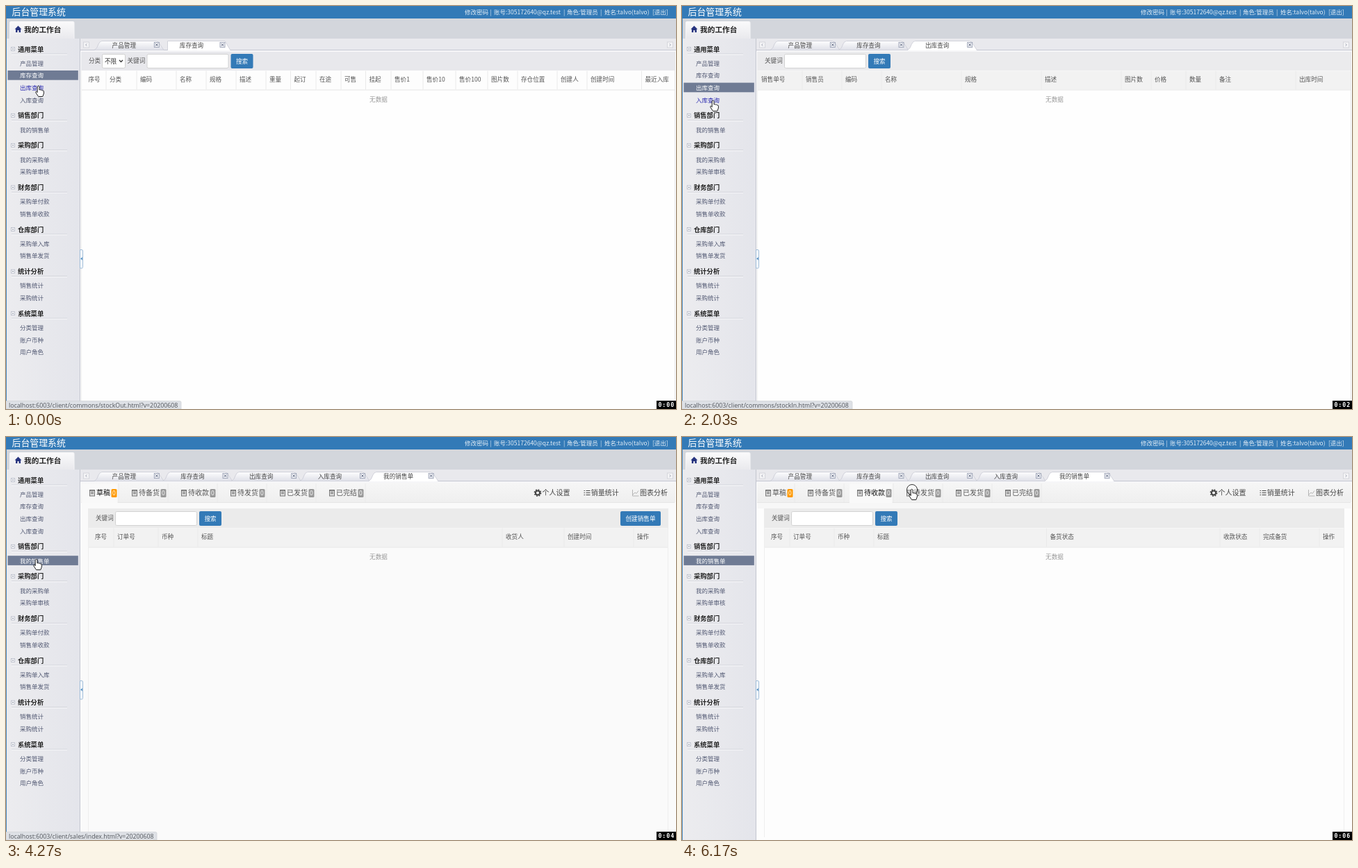
Recreate the animation shown at these times as an HTML page. Size 964 px wide and 581 px high, loop 6.27 s.

```html
<!DOCTYPE html>
<html lang="zh-CN">
<head>
<meta charset="utf-8">
<title>后台管理系统</title>
<style>
  html, body { margin: 0; width: 100%; height: 100%; overflow: hidden; background: #fff; }
  svg { position: absolute; left: 0; top: 0; width: 964px; height: 581px; }
  text { font-family: "Noto Sans CJK SC", "Noto Sans CJK", "Noto Sans", sans-serif; white-space: pre; }
  .url { font-family: "Open Sans", sans-serif; }
  .clock { font-family: "DejaVu Sans Mono", monospace; letter-spacing: 1px; }
</style>
</head>
<body>
<svg viewBox="0 0 964 581">
  <defs>
    <linearGradient id="side"><stop stop-color="#ececef"/><stop offset="1" stop-color="#e4e5eb"/></linearGradient>
    <linearGradient id="tab" x2="0" y2="1"><stop stop-color="#fdfdfe"/><stop offset="1" stop-color="#dfe0e8"/></linearGradient>
    <linearGradient id="desk" x2="0" y2="1"><stop stop-color="#fafafb"/><stop offset="1" stop-color="#e9e9ed"/></linearGradient>
    <linearGradient id="strip" x2="0" y2="1"><stop stop-color="#f6f6f6"/><stop offset="1" stop-color="#efefef"/></linearGradient>
  </defs>
  <g id="frame"></g>
  <g id="live"></g>
</svg>
<script>
const LOOP = 6270;
const BLUE = '#337ab7';

const MENU = [
  ['通用菜单', '产品管理', '库存查询', '出库查询', '入库查询'],
  ['销售部门', '我的销售单'],
  ['采购部门', '我的采购单', '采购单审核'],
  ['财务部门', '采购单付款', '销售单收款'],
  ['仓库部门', '采购单入库', '销售单发货'],
  ['统计分析', '销售统计', '采购统计'],
  ['系统菜单', '分类管理', '账户币种', '用户角色']
];
const TABS = ['产品管理', '库存查询', '出库查询', '入库查询', '我的销售单'];
const STAGES = ['草稿', '待备货', '待收款', '待发货', '已发货', '已完结'];

// Column label and its left edge
const COLS = {
  stock: '序号 118.5,分类 149,编码 193,名称 250,规格 293,描述 336,重量 379,起订 414.5,在途 451,可售 487,挂起 522.5,售价1 559,售价10 605,售价100 652,图片数 698,存仓位置 741,创建人 798,创建时间 841,最近入库 919.5',
  out: '销售单号 114,销售员 178,编码 235,名称 292,规格 407,描述 522,图片数 637,价格 680,数量 730,备注 773,出库时间 888',
  in: '采购单号 114,采购员 178,编码 235,名称 292,规格 384,描述 475.5,图片数 567,价格 610,数量 660,采购备注 703,入库备注 795,入库时间 887',
  draft: '序号 128,订单号 160,币种 224,标题 281,收货人 719,创建时间 808,操作 908',
  ready: '序号 128,订单号 160,币种 224,标题 281,备货状态 529.5,收款状态 779,完成备货 836,操作 922'
};

// Each step changes only what it lists
const STEPS = [
  [0, { x: 47, y: 115, ring: 0, sel: '库存查询', hover: '出库查询', tabs: 2, on: 1,
        view: 'stock', head: 1, rows: 1, stage: 0, url: 'commons/stockOut', fade: 0 }],
  [210, { x: 46, y: 117, ring: 1 }],
  [430, { ring: 0, sel: '出库查询', hover: '', on: -1, view: '', head: 0, rows: 0 }],
  [640, { view: 'out' }],
  [850, { tabs: 3, on: 2, head: 1 }],
  [1070, { rows: 1 }],
  [1510, { y: 121 }],
  [1720, { y: 129, hover: '入库查询', url: 'commons/stockIn' }],
  [1820, { x: 45, y: 134 }],
  [2030, { y: 136 }],
  [2240, { ring: 1 }],
  [2460, { ring: 0, sel: '入库查询', hover: '', on: -1, view: 'in', head: 0, rows: 0 }],
  [2670, { tabs: 4, on: 3, head: 1 }],
  [2880, { rows: 1 }],
  [2980, {}],
  [3420, { y: 146 }],
  [3630, { x: 44, y: 168, hover: '我的销售单', url: 'sales/index' }],
  [3840, { y: 176, hover: '', ring: 1 }],
  [4060, { ring: 0, sel: '我的销售单', on: -1, view: '', head: 0, rows: 0 }],
  [4270, { tabs: 5, on: 4, view: 'draft', head: 1, rows: 1 }],
  [4490, { x: 60, y: 165 }],
  [4590, { x: 98, y: 135 }],
  [4800, { x: 165, y: 94 }],
  [5010, { x: 192, y: 82, fade: 1 }],
  [5230, { ring: 1, url: '' }],
  [5440, { x: 210, ring: 0, stage: 1, view: 'ready', head: 0, rows: 0 }],
  [5650, { x: 268, y: 81 }],
  [5860, { ring: 1 }],
  [6070, { x: 295, y: 79, ring: 0, stage: 2 }],
  [6170, { x: 331, y: 75, ring: 1, head: 1, rows: 1 }]
];

const box = (x, y, w, h, fill, more = '') =>
  `<rect x="${x}" y="${y}" width="${w}" height="${h}" fill="${fill}" ${more}/>`;
const path = (d, stroke, fill = 'none', more = '') =>
  `<path d="${d}" stroke="${stroke}" fill="${fill}" ${more}/>`;
const text = (s, x, y, size = 8.6, fill = '#555', more = '') =>
  `<text x="${x}" y="${y + size * .38}" font-size="${size}" fill="${fill}" ${more}>${s}</text>`;
const MID = 'text-anchor="middle"';
const BOLD = 'font-weight="700"';
const hline = (x1, x2, y, c) => path(`M${x1} ${y}H${x2}`, c);
const vline = (x, y1, y2, c) => path(`M${x} ${y1}V${y2}`, c);

function button(s, x, y, w) {
  return box(x, y, w, 21, BLUE, 'rx="2"') + text(s, x + w / 2, y + 10.5, 8.6, '#fff', MID + ' font-weight="500"');
}

function search(x, y, focus) {
  return text('关键词', x, y + 9.5) +
    box(x + 28.5, y + .5, 117, 20, '#fff', `rx="2" stroke="${focus ? '#888' : '#d2d2d2'}"`) +
    button('搜索', x + 149, y, 32);
}

// Visits every menu line with its vertical centre
function eachLine(fn) {
  let y = 62;
  for (const [group, ...items] of MENU) {
    fn(group, y, true);
    items.forEach((s, i) => fn(s, y += i ? 17.6 : 20.5, false));
    y += 22.5;
  }
}

function frame() {
  let s = box(0, 0, 964, 581, '#fefefe') + box(0, 18, 964, 29, '#d3d6dc') +
    box(0, 0, 964, 18, BLUE) + text('后台管理系统', 8.5, 8, 12.9, '#fff');
  [['修改密码', 660], ['|', 696.5], ['账号:305172640@qz.test', 702], ['|', 802], ['角色:管理员', 807],
   ['|', 855], ['姓名:talvo(talvo)', 861], ['[退出]', 930]]
    .forEach(([t, x]) => s += text(t, x, 8.3, 8.5, '#e3edf6'));
  s += box(0, 47, 106, 534, 'url(#side)') + box(106, 47, 858, 17, '#e9e9ed');
  s += path('M5.5 47V24Q5.5 22.5 7 22.5H96.5Q98 22.5 98 24V47', '#f5f5f7', 'url(#desk)');
  s += path('M12.5 33.5L17.5 28.5L22.5 33.5H21V38H18.6V35H16.4V38H14V33.5Z', 'none', '#27347f');
  s += text('我的工作台', 26, 33.7, 10.7, '#222', BOLD);
  s += vline(.5, 18, 581, '#4b8ac0') + vline(106.5, 47, 581, '#c3c6cf');
  s += hline(107, 964, 63.5, '#c5c7d2') + box(107, 64, 857, 2, '#f6f6f8');
  for (const [x, d] of [[115.5, 1], [955.5, -1]])
    s += box(x - 4, 52, 8, 8, '#f4f4f6', 'stroke="#d5d6dc"') +
      path(`M${x + d} 54.5l${-2 * d} 1.5l${2 * d} 1.5`, '#aaaebb');
  eachLine((t, y, group) => {
    if (!group) return;
    s += box(7.5, y - 2.5, 5, 5, '#f7f7f9', 'stroke="#b4b8c5" stroke-width=".8"') + hline(9, 11, y, '#7f8798');
    s += text(t, 17, y, 9.3, '#222', BOLD) + hline(8, 88, y + 7, '#cfd1d8') + hline(8, 88, y + 8, '#f9f9fb');
  });
  return s;
}

function menu(st) {
  let s = '';
  eachLine((t, y, group) => {
    if (group) return;
    const sel = t === st.sel;
    if (sel) s += box(2.5, y - 7.1, 101.3, 13.7, '#6f7b94');
    s += text(t, 20, y, 8.5, sel ? '#fff' : t === st.hover ? '#2b2bb0' : '#515872');
  });
  return s;
}

function tabs(st) {
  let s = '';
  TABS.slice(0, st.tabs).forEach((t, i) => {
    const x = 127 + i * 98.7, on = i === st.on;
    const early = on && i === 1;
    const d = early ? `M232.5 64V50.5H315L323 64`
      : `M${x} 63.5Q${x + 4} 62 ${x + 6} 55Q${x + 8} 50.5 ${x + 11} 50.5H${x + 89}Q${x + 92} 50.5 ${x + 95} 56L${x + 100} 63.5`;
    s += path(d, '#c9cbd5', on ? '#fff' : 'url(#tab)', 'stroke-width=".8"');
    if (on) s += hline(early ? 233 : x + 1, early ? 322 : x + 99, 63.5, '#fff');
    const cx = 216.8 + i * 98.7 - (early ? 4 : 0);
    s += text(t, 169.8 + i * 98.7 - (early ? 1.5 : 0), 57, 8.6, '#444', MID);
    s += box(cx - 3.5, 52.5, 7, 7, '#f3f4f8', 'stroke="#8e96ab" stroke-width=".8"') +
      path(`M${cx - 1.8} 54.2l3.6 3.6m0-3.6l-3.6 3.6`, '#5c667f');
  });
  return s;
}

function table(st, x1, x2, y, bg) {
  let s = '';
  if (st.head) {
    s += box(x1, y, x2 - x1, 27, bg) + hline(x1, x2, y + 27.5, '#e6e6e6');
    COLS[st.view].split(',').forEach((col, i) => {
      const [t, x] = col.split(' ');
      if (i) s += vline(x - 5, y, y + 27, '#eaeaea');
      s += text(t, +x, y + 12.5);
    });
  }
  if (st.rows) s += text('无数据', 536, y + 41.5, 8.6, '#999', MID);
  return s;
}

function list(st) {
  const stock = st.view === 'stock';
  let s = box(108, 66, 855, 27, stock ? '#e8e8ec' : '#ebebed');
  if (stock) {
    s += text('分类', 119, 79) + box(138.5, 69.5, 33, 20, '#fff', 'rx="2" stroke="#cfcfcf"') +
      text('不限', 142, 79.5, 8.6, '#333') + path('M163 78l2.5 2.5l2.5-2.5', '#333', 'none', 'stroke-width="1.3"') +
      search(174.5, 69, false);
  } else s += search(119, 69, !st.head);
  s += table(st, 109, 962, 93.5, stock ? '#fdfdfd' : '#f2f2f2');
  return s + vline(108.5, 93, 569, '#eee') + vline(962.5, 66, 569, '#e6e6e8');
}

function note(x) {
  return box(x, 76.5, 7, 8.5, '#dcdcdc', 'stroke="#777"') + hline(x, x + 7, 77, '#555') +
    path(`M${x + 1.5} 79.5h4m-4 2h4`, '#666', 'none', 'stroke-width=".9"');
}

function sales(st) {
  const draft = st.view === 'draft';
  let s = box(108, 66, 855, 515, draft ? '#fafafa' : '#fdfdfd') + box(108, 66, 855, 28, 'url(#strip)') +
    hline(108, 962, 94.5, '#e6e6e6');
  if (!draft) s += box(108, 95, 855, 8, '#f7f7f7');
  STAGES.forEach((t, i) => {
    const x = i ? 181 + (i - 1) * 71 : 120, on = i === st.stage;
    const end = x + 10 + t.length * 10 + 1.5;
    if (on) s += box(x - 11, 67, end - x + 20, 28, st.stage === 1 ? '#fff' : '#f9f9f9');
    s += vline(end + 10.5, 67, 94, '#eaeaea') + note(x + .5) +
      text(t, x + 10, 80.3, 10, on ? '#111' : '#555', on ? 'font-weight="500"' : '') +
      box(end, 75, 8, 12, i ? '#999' : '#f90', 'rx="1.5"') + text('0', end + 4, 81, 8.6, '#fff', MID);
  });
  s += '<circle cx="765" cy="80.5" r="3.1" fill="none" stroke="#444" stroke-width="2"/>' +
    '<circle cx="765" cy="80.5" r="4.6" fill="none" stroke="#444" stroke-width="1.6" stroke-dasharray="1.8 1.81"/>' +
    text('个人设置', 771.5, 80.3, 10, '#444');
  s += path('M831.5 77.5h1.5m1.5 0h6m-9 3h1.5m1.5 0h6m-9 3h1.5m1.5 0h6', '#444') + text('销量统计', 841.8, 80.3, 10, '#444');
  s += path('M901.5 76V85H910.5M902 83l3-3l2 1.5l3-4', '#b5b5b5') + text('图表分析', 912, 80.3, 10, '#444');
  if (!st.head) return s + box(118, 103, 835, 472, '#fff');
  s += box(118, 103, 835, 28, '#ebebeb') + search(129, 107, false);
  if (draft) s += button('创建销售单', 884, 107, 58);
  return s + table(st, 118, 953, 131.5, '#f2f2f2') +
    vline(118.5, 131, 577, '#eee') + vline(952.5, 131, 577, '#eee');
}

function status(st) {
  if (!st.url) return '';
  const url = `localhost:6003/client/${st.url}.html?v=20200608`;
  const end = { 'commons/stockOut': 252, 'commons/stockIn': 245, 'sales/index': 217 }[st.url];
  const bar = st.fade ? '' : path(`M0 581V569.5H${end - 2}Q${end} 569.5 ${end} 571.5V581Z`, '#cfd1d5', '#dee1e6', 'stroke-width=".7"');
  return bar + text(url, 4, 576, 8.8, st.fade ? '#d4d4d6' : '#50545a', 'class="url"');
}

function pointer(st) {
  const ring = st.ring ? '<circle cy="1" r="7.5" fill="#fff" fill-opacity=".35" stroke="#333"/>' : '';
  return `<g transform="translate(${st.x} ${st.y})">${ring}` +
    path('M-1.8 1.2Q-.4-.6 1 1.2V6Q2.4 5 3.4 6.3Q4.8 5.5 5.7 7Q7.2 6.6 7.4 8.2V11L5.8 15.5H-.4L-4.2 9.8Q-4.4 7.8-2.8 8.4L-1.8 9.6Z',
      '#222', '#fff', 'stroke-linejoin="round"') + '</g>';
}

function clock(time) {
  return box(936, 569, 28, 12, '#000') +
    text('0:0' + Math.floor((time + 30) / 1000), 950.3, 575, 8.2, '#fff', `class="clock" ${MID} ${BOLD}`);
}

function scene(time, st) {
  const handle = path('M106.5 351.5H109Q110.5 351.5 110.5 353V376.5Q110.5 378 109 378H106.5Z', '#9dbbd8', '#fff') +
    path('M109.6 362V366.5L107.4 364.2Z', 'none', BLUE);
  const page = !st.view ? '' : /draft|ready/.test(st.view) ? sales(st) : list(st);
  return menu(st) + tabs(st) + page + handle + status(st) + clock(time) + pointer(st);
}

let state = {};
const scenes = STEPS.map(([time, change]) => {
  state = { ...state, ...change };
  return [time, scene(time, state)];
});

const live = document.getElementById('live');
document.getElementById('frame').innerHTML = frame();
const start = performance.now();
let shown = -1;

function tick() {
  const t = (performance.now() - start) % LOOP;
  const i = scenes.findLastIndex(([time]) => time <= t);
  if (i !== shown) live.innerHTML = scenes[shown = i][1];
  requestAnimationFrame(tick);
}
tick();
</script>
</body>
</html>
```
